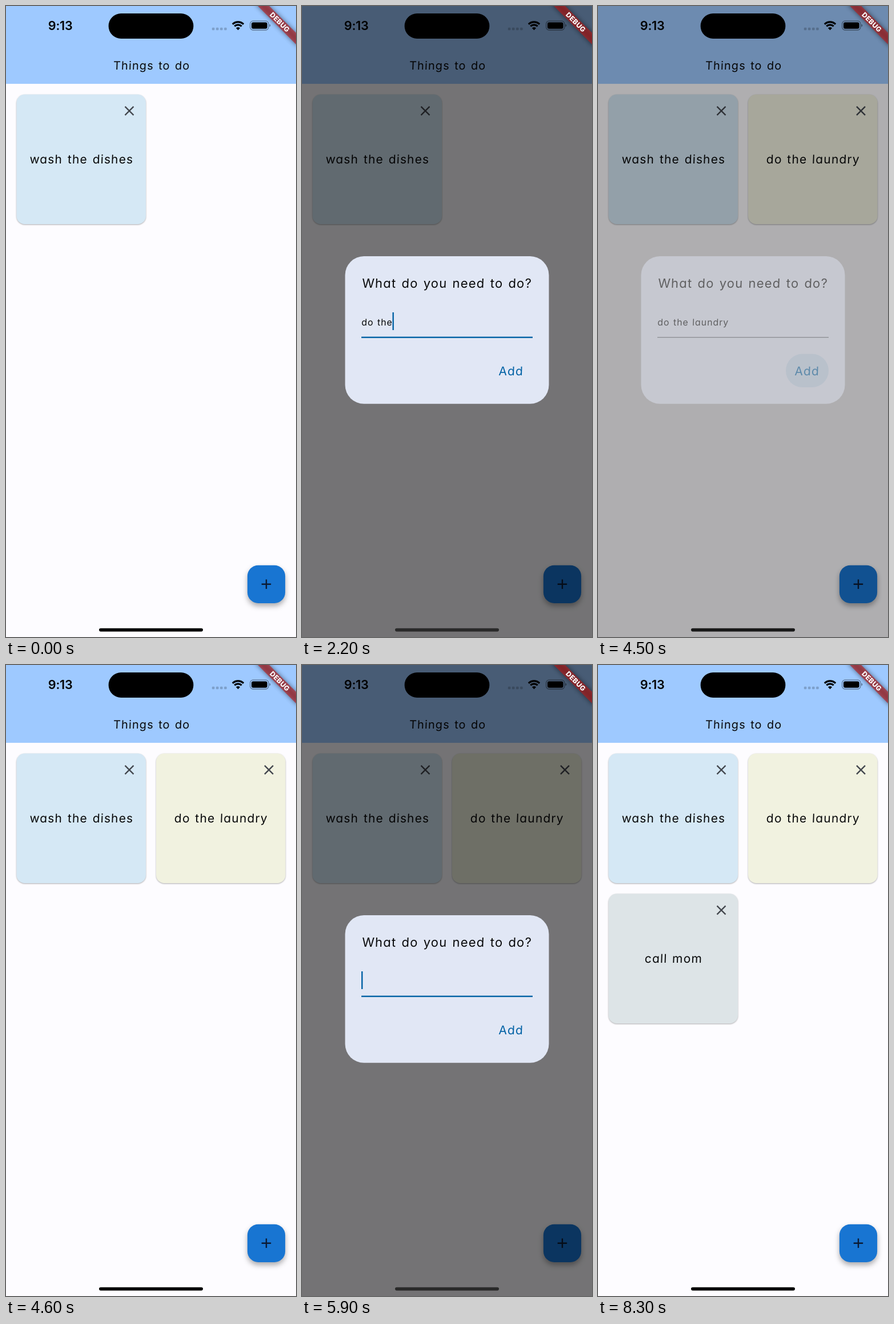
An HTML page for the animation above (9300 ms loop, 508 by 1102 pixels).

```html
<!DOCTYPE html>
<html lang="en">
<head>
<meta charset="utf-8">
<title>Things to do</title>
<style>
  html, body { margin: 0; width: 100%; height: 100%; overflow: hidden; background: #fdfcff; }
  svg { display: block; width: 508px; height: 1102px; }
  .hand {
    font-family: Inter, "Open Sans", sans-serif;
    font-weight: 400;
    font-feature-settings: "cv11";
    letter-spacing: .055em;
    word-spacing: .08em;
    white-space: pre;
    fill: #08090a;
  }
  .mid { text-anchor: middle; }
  .sys { font-family: Inter, Roboto, sans-serif; text-anchor: middle; }
  .card rect { filter: drop-shadow(0 1.2px 1.2px rgba(0, 0, 0, .32)); }
  .card path { stroke: #43474e; stroke-width: 2.36; fill: none; }
  #fab { filter: drop-shadow(0 5px 5px rgba(0, 0, 0, .32)); }
</style>
</head>
<body>
<svg viewBox="0 0 508 1102">
  <defs>
    <filter id="blur" x="-20%" y="-150%" width="140%" height="400%"><feGaussianBlur stdDeviation="4.2"/></filter>
    <clipPath id="fabClip"><rect x="422.9" y="976.7" width="66.2" height="66.2" rx="18.9"/></clipPath>
  </defs>

  <rect width="508" height="1102" fill="#fdfcff"/>
  <rect width="508" height="135.9" fill="#9ec9ff"/>
  <g id="title"></g>
  <g id="cards"></g>

  <rect id="fab" x="422.9" y="976.7" width="66.2" height="66.2" rx="18.9" fill="#1875d2"/>
  <g id="press" clip-path="url(#fabClip)">
    <rect x="422" y="976" width="68" height="68" fill="#fff" opacity=".07"/>
    <circle cx="459" cy="1012.5" r="16" fill="#001c38" opacity=".09"/>
  </g>
  <path d="M447.7 1009.8h16.5M456 1001.5v16.5" stroke="#0b1a33" stroke-width="2.36"/>

  <rect id="scrim" width="508" height="1102"/>

  <g id="dialog">
    <rect x="75.5" y="437" width="357" height="257.8" rx="33" fill="#e1e7f5"/>
    <g id="ask"></g>
    <rect id="line" x="104" width="300"/>
    <rect id="cursor" y="535" width="2.4" height="31" fill="#0061a4"/>
    <rect id="ripple" x="329" y="607.5" width="75" height="58.5" rx="29" fill="#0061a4"/>
  </g>

  <text class="sys" x="95.2" y="42.4" font-size="21.6" font-weight="600" letter-spacing="-.2">9:13</text>
  <rect x="179.6" y="13.1" width="148.8" height="43.8" rx="21.9"/>
  <g id="dots" opacity=".2"></g>
  <g fill="none" stroke="#000" stroke-width="3.2">
    <path d="M396.9 31.9A13.6 13.6 0 0 1 416.1 31.9M400.3 35.4A8.7 8.7 0 0 1 412.7 35.4"/>
    <path d="M406.5 42.2L402.9 38.6A5 5 0 0 1 410.1 38.6Z" fill="#000" stroke="none"/>
  </g>
  <rect x="427.7" y="26.2" width="32.2" height="15.8" rx="5" fill="none" stroke="#000" stroke-opacity=".42" stroke-width="1.3"/>
  <rect x="430" y="28.5" width="27.6" height="11.2" rx="3"/>
  <path d="M461.4 31.6q2 .8 2 2.5t-2 2.5z" opacity=".42"/>
  <rect id="home" x="163" y="1086.8" width="182" height="5.6" rx="2.8"/>

  <g transform="translate(508 0) rotate(45)">
    <rect x="-52" y="33.1" width="104" height="14.2" opacity=".5" filter="url(#blur)"/>
    <rect x="-52" y="33.1" width="104" height="14.2" fill="#b71c1c" fill-opacity=".63"/>
    <text class="sys" y="44.4" font-size="12" font-weight="800" letter-spacing=".3" fill="#fff">DEBUG</text>
  </g>
</svg>
<script>
const LOOP = 9300;
const $ = id => document.getElementById(id);

function add(parent, tag, attrs, text = '') {
  const node = document.createElementNS('http://www.w3.org/2000/svg', tag);
  for (const key in attrs) node.setAttribute(key, attrs[key]);
  node.textContent = text;
  parent.append(node);
  return node;
}

// Slightly slanted lettering on a given baseline
function write(parent, x, y, size, text, cls = 'hand mid') {
  return add(parent, 'text', {
    class: cls, 'font-size': size, transform: `translate(${x} ${y}) skewX(-2)`
  }, text);
}

function card(x, y, color, text) {
  const g = add($('cards'), 'g', { class: 'card', transform: `translate(${x} ${y})` });
  add(g, 'rect', { width: 226.5, height: 226.5, rx: 14.2, fill: color });
  add(g, 'path', { d: 'M190 21.2l15 15m0-15l-15 15' });
  write(g, 113.6, 120.5, 21, text);
  return g;
}

write($('title'), 255, 111, 20, 'Things to do');
card(18.5, 154.5, '#d5e8f5', 'wash the dishes');
const laundry = card(263, 154.5, '#f1f2e0', 'do the laundry');
const call = card(18.5, 399.5, '#dde4e7', 'call mom');
write($('ask'), 253.8, 492, 22, 'What do you need to do?');
const typed = write($('ask'), 104, 558, 16, '', 'hand');
write($('dialog'), 366, 644.5, 21, 'Add').style.fill = '#0061a4';
for (let i = 0; i < 4; i++)
  add($('dots'), 'rect', { x: 360.8 + 7.1 * i, y: 37.7, width: 4.6, height: 4.6, rx: 1.2 });

// keys: the moment each character is typed
const visits = [
  { press: 900, tap: 4300, close: 4500, text: 'do the laundry',
    keys: [1600, 1700, 1800, 2000, 2100, 2200, 2300, 2500, 2600, 2800, 3000, 3200, 3400, 3600] },
  { press: 5700, tap: 8100, close: 8200, text: 'call mom',
    keys: [6400, 6500, 6600, 6700, 6800, 7000, 7200, 7400] }
];

function blink(age) {
  const p = age % 1000;
  return p < 500 ? 1 : p < 600 || p >= 900 ? .5 : 0;
}

function show(id, opacity) { $(id).setAttribute('opacity', opacity); }

function draw(time) {
  const t = Math.floor(time % LOOP / 100) * 100;
  const visit = visits.find(v => t >= v.press && t < v.close + 100);
  const pressed = visit && t === visit.press;
  const open = visit && !pressed;
  const opening = open && t === visit.press + 100;
  const closing = open && t >= visit.close;
  const shade = !open ? 0 : opening ? .46 : closing ? .31 : .54;

  laundry.style.display = t >= 4500 ? '' : 'none';
  call.style.display = t >= 8200 ? '' : 'none';
  show('press', pressed ? 1 : 0);
  show('scrim', shade);
  show('dialog', !open ? 0 : opening ? .75 : closing ? .47 : 1);
  const gray = Math.round(shade / .54 * 41);
  $('home').setAttribute('fill', `rgb(${gray},${gray},${gray})`);
  if (!open) return;

  const count = visit.keys.filter(k => k <= t).length;
  const last = count ? visit.keys[count - 1] : visit.press + 100;
  typed.textContent = visit.text.slice(0, count);
  $('cursor').setAttribute('x', 104 + (count ? typed.getComputedTextLength() : 0));
  show('cursor', closing ? 0 : blink(t - last));

  const weight = opening ? 1.6 : closing ? 1.2 : 2.4;
  $('line').setAttribute('y', 578.7 - weight / 2);
  $('line').setAttribute('height', weight);
  $('line').setAttribute('fill', opening ? '#3a6c92' : closing ? '#5d6168' : '#0061a4');
  show('ripple', t < visit.tap ? 0 : t === visit.tap ? .07 : .12);
}

const start = performance.now();
function tick() {
  draw(performance.now() - start);
  requestAnimationFrame(tick);
}
tick();
</script>
</body>
</html>
```
